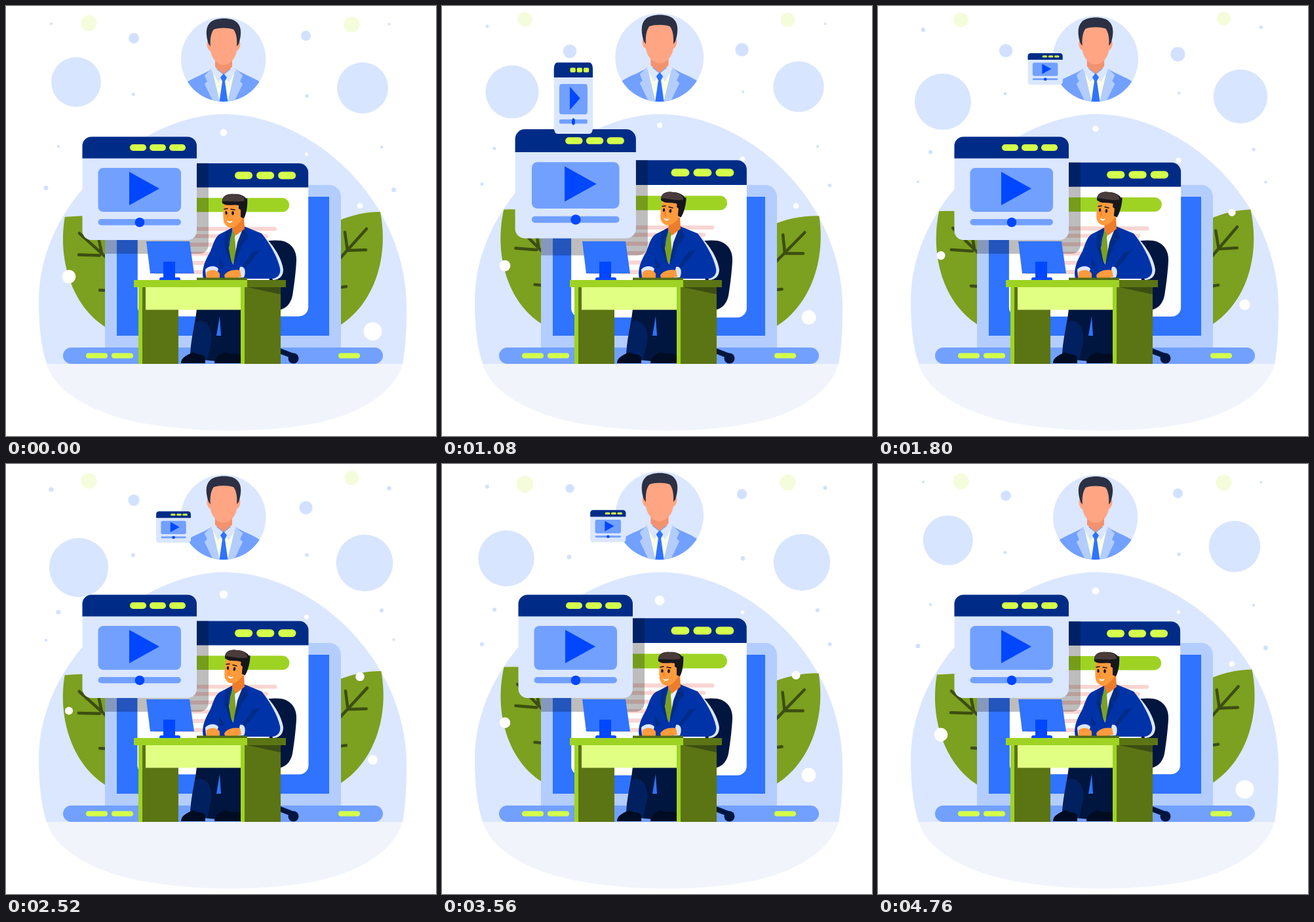
Write an HTML page with a canvas that moves like this. It is 656x656 px and loops after 4800 ms.

```html
<!DOCTYPE html>
<html lang="en">
<head>
<meta charset="utf-8">
<title>Online meeting</title>
<style>
html, body { margin: 0; width: 100%; height: 100%; overflow: hidden; background: #fff; }
canvas { display: block; width: 656px; height: 656px; }
</style>
</head>
<body>
<canvas id="stage" width="656" height="656"></canvas>
<script>
const ctx = document.getElementById('stage').getContext('2d');
const LOOP = 4800, STEP = 40;
const C = {
  pale: '#dbe7ff', soft: '#b3cdff', sky: '#72a0ff', blue: '#2f73ff', vivid: '#0047ff',
  navy: '#002c87', suit: '#0033a8', ink: '#00163f', lime: '#d4ff4a', grass: '#9ed324',
  leaf: '#7ca01f', olive: '#5b7514', vein: '#3c4e12', skin: '#ff9b3d', hair: '#17171c'
};

const shape = (d, color) => { ctx.fillStyle = color; ctx.fill(new Path2D(d)); };
const line = (d, color, width) => {
  ctx.strokeStyle = color; ctx.lineWidth = width; ctx.lineCap = 'round'; ctx.stroke(new Path2D(d));
};
function box(x1, y1, x2, y2, color, radius = 0) {
  ctx.fillStyle = color;
  ctx.beginPath();
  ctx.roundRect(x1, y1, x2 - x1, y2 - y1, radius);
  ctx.fill();
}
function dot(x, y, r, color) {
  ctx.fillStyle = color;
  ctx.beginPath();
  ctx.arc(x, y, r, 0, Math.PI * 2);
  ctx.fill();
}
function layer(draw) { ctx.save(); draw(); ctx.restore(); }
function scaleAt(x, y, s) { ctx.translate(x, y); ctx.scale(s, s); ctx.translate(-x, -y); }
function turnAt(x, y, angle) { ctx.translate(x, y); ctx.rotate(angle); ctx.translate(-x, -y); }

const wave = (turns) => Math.cos(turns * Math.PI * 2);
const smooth = (a, b, t) => { const u = Math.min(1, Math.max(0, (t - a) / (b - a))); return u * u * (3 - 2 * u); };
function keyed(t, times, values) {
  if (t <= times[0]) return values[0];
  for (let i = 1; i < times.length; i++) {
    if (t <= times[i]) {
      const u = (t - times[i - 1]) / (times[i] - times[i - 1]);
      return values[i - 1] + (values[i] - values[i - 1]) * u;
    }
  }
  return values[values.length - 1];
}

// Smooth closed curve through values at uneven moments of the loop.
const MOMENTS = [0, 640, 1080, 1800, 2520, 3560];
function drift(t, values) {
  const n = MOMENTS.length;
  const at = (i) => MOMENTS[(i + n) % n] + LOOP * Math.floor(i / n);
  const val = (i) => values[(i + n) % n];
  const slope = (i) => (val(i + 1) - val(i - 1)) / (at(i + 1) - at(i - 1));
  let i = n - 1;
  while (MOMENTS[i] > t) i--;
  const span = at(i + 1) - at(i), u = (t - at(i)) / span, v = 1 - u;
  return val(i) * v * v * (1 + 2 * u) + val(i + 1) * u * u * (3 - 2 * u)
    + span * u * v * (slope(i) * v - slope(i + 1) * u);
}

// Each bubble: x, middle y, travel, time of lowest point, radius, radius change.
const BUBBLES = {
  '#d2e1ff': [
    [195, 53.5, 17, .29, 8.5, 2], [457.5, 57, 16.5, .375, 9, 2],
    [69, 33, 6, .53, 2.8, .8], [584.5, 32, 6, .62, 2.6, .8],
    [194, 136.5, 5.5, .7, 2.7, .7], [459, 137.5, 6.5, .745, 2.7, .7],
    [80, 220, 6, .55, 2.8, .6], [573, 219, 5.5, .63, 2.6, .6],
    [61, 273, 5, .93, 2.8, .7], [591.5, 274, 6.5, .97, 2.8, .7]
  ],
  '#f5fcdc': [[126.5, 25.5, 5.5, .77, 12, 1], [527.5, 24.5, 5.5, .87, 11.5, 1]],
  '#ffffff': [
    [332, 195, 13, .725, 5.7, 1.8], [458.5, 230, 5.5, .375, 3.2, .7],
    [540, 314, 12, .61, 5.5, 1.5], [96, 394.5, 18.5, .99, 8.2, 2.2],
    [559.5, 473.5, 23, .985, 10.7, 3.3]
  ]
};

function drawBubbles(t) {
  const yl = drift(t, [116, 121, 131, 146, 158, 144]);
  const yr = drift(t, [125, 113, 123, 138, 151, 150]);
  dot(drift(t, [107, 109, 107, 99, 111, 98]), yl, 38 + (yl - 116) / 6, '#d8e5ff');
  dot(drift(t, [544, 548, 544, 553, 547, 549]), yr, 37 + (yr - 113) / 6, '#d8e5ff');
  for (const [color, list] of Object.entries(BUBBLES)) {
    for (const [x, y, travel, low, r, grow] of list) {
      const w = wave(t / LOOP - low);
      dot(x, y + travel * w, r + grow * w, color);
    }
  }
}

function drawGround() {
  shape('M62 546C74 588 130 620 200 635C290 652 400 652 480 635C548 619 594 586 605 546Z', '#f1f5fb');
  shape('M333 165C212 165 50 292 50 450C50 490 54 522 62 546H605C609 525 611 500 611 460C611 296 466 165 333 165Z', C.pale);
}

function drawLeaves(t) {
  const left = -5 + 6 * wave(2 * t / LOOP - .06);
  const right = 2.2 + 6 * wave(2 * t / LOOP - .31);
  layer(() => {
    turnAt(300, 400, -left / 190);
    shape('M90 321C78 390 103 462 156 492H220V340C180 318 130 318 90 321Z', C.leaf);
    line('M112 346L156 386M111 379L143 380M141 352L146 376M143 433L165 434', C.vein, 4.5);
  });
  layer(() => {
    turnAt(425, 420, right / 140);
    shape('M571 314C585 386 560 456 508 488H450V364C485 332 530 314 571 314Z', C.leaf);
    line('M550 340L505 390M517 345L521 373L549 372M505 430L519 428', C.vein, 4.5);
  });
}

function drawLaptop() {
  box(151, 273, 511, 530, C.soft, [18, 18, 0, 0]);
  box(169, 291, 493, 503, C.blue);
  box(87, 521, 575, 546, C.sky, 12.5);
  for (const x of [122, 161, 507]) box(x, 529.5, x + 33, 537.5, C.lime, 4);
}

function drawPage(pulse) {
  layer(() => {
    scaleAt(331, 412, 1 + .03 * pulse);
    box(201, 240.3, 461, 473.3, '#fff', 14);
    box(201, 240.3, 461, 277, C.navy, [14, 14, 0, 0]);
    for (const x of [349, 382, 415]) box(x, 253, x + 27, 264.5, C.lime, 6);
    box(225, 293, 432, 314.5, C.grass, 11);
    const ends = [413, 400, 340, 340, 340, 340];
    ends.forEach((end, i) => {
      const y = i < 2 ? 340 + i * 11 : 336 + i * 14;
      box(225, y - 3, end, y + 3, '#f9d5d2', 3);
    });
  });
}

function drawPlayer(x, y, sx, sy = sx) {
  layer(() => {
    ctx.translate(x, y);
    ctx.scale(sx, sy);
    ctx.translate(-204, -278);
    box(116.5, 199.5, 291, 357, C.pale, 14);
    box(116.5, 199.5, 291, 232.5, C.navy, [14, 14, 0, 0]);
    for (const left of [189, 219, 249]) box(left, 211, left + 25, 221, C.lime, 5);
    box(140.5, 247, 267, 314, C.sky, 8);
    shape('M188 253L234 278.5L188 304Z', C.vivid);
    box(140.5, 325, 267, 334.5, C.sky, 5);
    dot(204, 330, 7.3, C.vivid);
  });
}

function drawMainPlayer(t, pulse) {
  const lift = smooth(470, 1070, t) * (1 - smooth(1100, 1450, t));
  const size = 1 + .056 * lift;
  layer(() => {
    ctx.beginPath();
    ctx.rect(151, 240 - 5 * pulse, 360, 300);
    ctx.clip();
    ctx.translate(222, 299 - 2 * lift);
    ctx.scale(size, size);
    box(-87, -79, 87, 79, 'rgba(0,0,0,.26)', 14);
  });
  drawPlayer(204, 278 - 7 * lift, size);
}

function drawFlyingPlayer(t, pulse) {
  const START = 860, END = 1560;
  const clock = t < 2700 ? t : END - (t - 3900);
  if (clock < START) return;
  const times = [START, 1080, 1300, END];
  const settle = smooth(1300, END, clock) * pulse;
  drawPlayer(
    keyed(clock, times, [204, 200.5, 203, 256]) - 2.7 * settle,
    keyed(clock, times, [271, 140.5, 90, 96.4]) - 1.8 * settle,
    keyed(clock, times, [.9, .34, .32, .302]) * (1 + .03 * settle),
    keyed(clock, times, [1, .69, .4, .302]) * (1 + .03 * settle)
  );
}

function drawAvatar(pulse) {
  layer(() => {
    scaleAt(332, 147, 1 + .045 * pulse);
    layer(() => {
      ctx.beginPath();
      ctx.arc(331.7, 81.5, 64.5, 0, Math.PI * 2);
      ctx.clip();
      box(260, 10, 400, 150, C.pale);
      shape('M270 122C280 110 300 106 314 96H350C364 106 384 110 394 122V150H270Z', C.sky);
      shape('M312 97L332 108L352 97L342 150H322Z', '#fbffe2');
      shape('M314 95L303 106L307 115L303 119L318 150H327Z', C.soft);
      shape('M350 95L361 106L357 115L361 119L346 150H337Z', C.soft);
      shape('M317 93L332 105L324 117L313 97ZM347 93L332 105L340 117L351 97Z', C.pale);
      shape('M319 78H345V93L332 104L319 93Z', '#f3926f');
      shape('M332 103L337 109L334 115L339 150H325L330 115L327 109Z', C.blue);
    });
    shape('M311 53C305 51 305 65 312 69C314 81 323 90 332 90C341 90 350 81 352 69C359 65 359 51 353 53V32H311Z', '#ffa583');
    shape('M309 58C305 46 304 33 311 26C317 18 345 16 353 26C360 33 359 46 355 58L352 62C353 50 351 41 347 36C338 33 326 33 317 36C313 41 311 50 312 62Z', '#2b3044');
  });
}

function drawChair() {
  shape('M392 360C402 357 412 357 420 358C436 361 444 374 443 389C442 408 439 430 437 442C434 456 425 464 410 465Z', C.ink);
  line('M412 524L438 534', C.ink, 8);
  dot(438.5, 537.5, 8, C.ink);
}

function drawHead(tilt) {
  shape('M346 328L363 322L364 340L351 350L345 341Z', '#ee7d2b');
  layer(() => {
    ctx.translate(0, -3 * tilt);
    turnAt(350, 340, .1 * tilt);
    shape('M333 299C331 309 331 320 332 328C334 337 343 341 350 336C357 331 361 325 363 316L361 297Z', C.skin);
    shape('M355 299L368 293C369 303 367 317 363 324L358 322L358 311L355 309Z', C.hair);
    shape('M330 301C328 290 338 286 347 287C358 286 366 291 368 297C366 304 360 305 355 304C347 302 339 306 332 302Z', C.hair);
    shape('M330 298C330 289 339 286 348 287C358 287 364 291 364 297C352 300 341 297 330 298Z', '#493c3b');
    line('M333 310L338 309M343 310L349 311', C.hair, 1.6);
    ctx.fillStyle = C.hair;
    ctx.beginPath();
    ctx.ellipse(336, 315.5, 1.7, 2.8, 0, 0, 7);
    ctx.ellipse(346, 316, 1.8, 2.9, 0, 0, 7);
    ctx.fill();
    line('M339 317L338 323L340 324', '#ee7d2b', 1.2);
    shape('M337 327.5C340 329 343 329 346 327.5C344 332 339 332.5 337 327.5Z', '#fff');
  });
}

function drawMan(tilt) {
  shape('M291 462H358V538L322 542L281 538C281 510 288 490 291 462Z', C.ink);
  shape('M290 482C303 476 316 490 313 512L307 540L281 538C282 520 285 500 290 482Z', '#002060');
  shape('M326 473L328 503L321 503Z', C.blue);
  shape('M267 545C267 536 277 532 286 528C293 533 299 529 304 536V545ZM318 545C318 535 327 531 334 528C342 533 350 528 358 533V545Z', '#000c22');

  shape('M392 350C405 361 420 382 423 402C423 412 417 418 407 418L398 390Z', C.pale);
  shape('M344 339L326 348C318 353 316 365 311 376C303 389 298 403 301 416H405C414 416 420 409 418 400C414 382 402 362 390 347L363 336Z', C.suit);
  shape('M376 375L388 372L366 399L361 397ZM325 384L333 397L326 401Z', C.navy);
  shape('M346 340L363 335L358 357L347 395L339 376Z', '#eaf1ff');
  shape('M346 342L351 345L349 353L351 378L346 394L339 381L342 355Z', C.leaf);
  shape('M345 338L338 360L345 397L333 367L335 344ZM363 335L370 352L362 362L346 398L353 361Z', C.navy);
  drawHead(tilt);

  shape('M304 402C309 396 320 395 324 401L321 411L305 413ZM357 398C364 396 367 405 363 414L353 415Z', C.pale);
  shape('M306 406C312 401 322 402 326 408V415H305Z', C.skin);
  shape('M333 411C336 404 348 401 357 403L359 413L350 415H334Z', C.skin);
}

function drawDesk() {
  shape('M214 359H280L287 408H220Z', C.blue);
  box(240, 390, 258, 418, C.vivid);
  box(234, 414, 266, 418, C.vivid, [3, 3, 0, 0]);
  box(291, 414.5, 368, 418, '#526d13');
  box(207, 429, 263, 546, C.olive);
  box(202, 429, 208, 546, C.grass);
  box(208, 429, 214, 463, C.olive);
  box(213, 429, 358, 463.5, '#e1ff83');
  box(363, 429, 419, 546, C.olive);
  box(358, 429, 364, 546, C.grass);
  shape('M368 429H419V440Z', C.vein);
  box(195, 418, 368, 429, C.grass);
  box(368, 418, 427, 429, C.olive);
}

function draw(t) {
  const pulse = (1 + wave(2 * t / LOOP - .43)) / 2;
  const tilt = smooth(720, 1040, t) * (1 - smooth(2800, 3200, t));
  ctx.fillStyle = '#fff';
  ctx.fillRect(0, 0, 656, 656);
  drawGround();
  drawLeaves(t);
  drawBubbles(t);
  drawLaptop();
  drawPage(pulse);
  drawMainPlayer(t, pulse);
  drawChair();
  drawMan(tilt);
  drawDesk();
  drawAvatar(pulse);
  drawFlyingPlayer(t, pulse);
}

const begin = performance.now();
function tick() {
  const elapsed = (performance.now() - begin) % LOOP;
  draw(Math.floor(elapsed / STEP) * STEP);
  requestAnimationFrame(tick);
}
tick();
</script>
</body>
</html>
```
